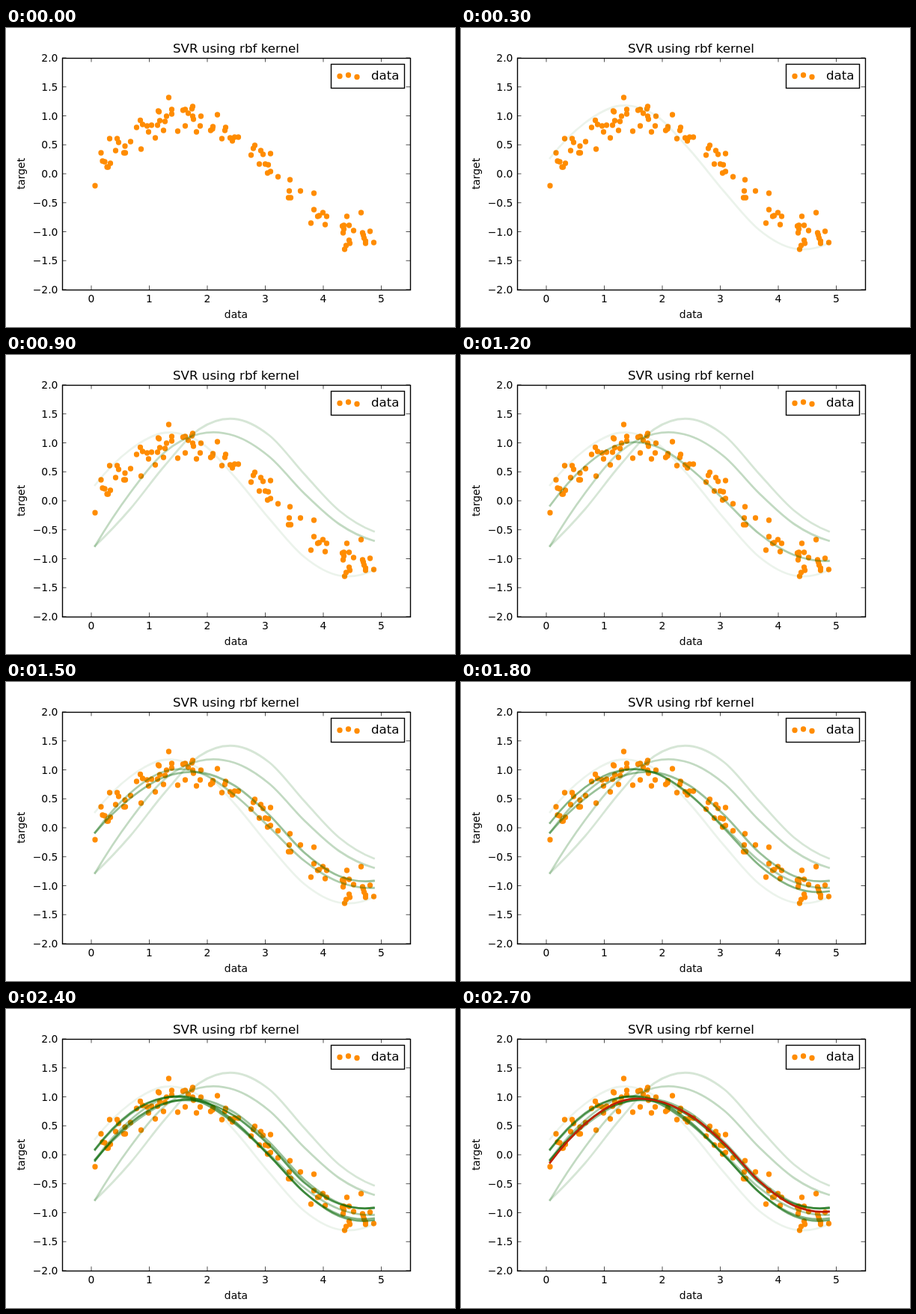
These frames come from a looping animation (600x400 px, 3900 ms). An HTML page:

```html
<!DOCTYPE html>
<html lang="en">
<head>
<meta charset="utf-8">
<title>SVR using rbf kernel</title>
<style>
  html, body { margin: 0; width: 100%; height: 100%; overflow: hidden; background: #fff; }
  svg { display: block; width: 600px; height: 400px; }
  text { font: 13.89px "DejaVu Sans", sans-serif; fill: #000; }
  .large { font-size: 16.67px; }
  .frame { fill: none; stroke: #000; stroke-width: 1.39; }
  .ticks { stroke: #000; stroke-width: 0.69; }
  .dots { fill: #ff8c00; }
  .fits { fill: none; stroke-width: 2.78; stroke-linecap: square; stroke-linejoin: round; }
</style>
</head>
<body>
<svg id="plot" viewBox="0 0 600 400"></svg>
<script>
const LOOP = 3900, STEP = 300;
const LEFT = 75, RIGHT = 540, TOP = 40, BOTTOM = 350, UNIT = 77.5;
const plot = document.getElementById('plot');

function add(parent, tag, attrs, text) {
  const node = document.createElementNS('http://www.w3.org/2000/svg', tag);
  for (const key in attrs) node.setAttribute(key, attrs[key]);
  if (text) node.textContent = text;
  return parent.appendChild(node);
}
const group = name => add(plot, 'g', { class: name });
const label = (text, x, y, anchor = 'middle', extra = {}) =>
  add(plot, 'text', { x, y, 'text-anchor': anchor, ...extra }, text);

// Samples as [x, y] in stage pixels
const rising = [
  [119, 211], [127, 167], [129, 178], [132, 179], [135, 186], [136.5, 186], [138.5, 148],
  [139.5, 181], [146.5, 164], [148.5, 148], [150.5, 153], [157.5, 167], [159, 158],
  [159.5, 167], [166.5, 152], [174.5, 133], [179.5, 123.5], [180.5, 162], [182.5, 129],
  [188.5, 131], [190.5, 139], [194.5, 130], [199.5, 147], [202.5, 130], [203.5, 111],
  [204.5, 112], [205.5, 124], [210.5, 137], [212.5, 125], [214.5, 118], [217.5, 93],
  [221.5, 109], [221.5, 115], [229.5, 138], [236.5, 110], [239.5, 109], [239.5, 131],
  [243.5, 114], [248.5, 108], [249.5, 105], [249.5, 118], [250.5, 122]
];
const falling = [
  [254.5, 139], [259.5, 131], [260.5, 118], [273.5, 137], [276, 135], [276.5, 132],
  [282.5, 116], [288.5, 148], [292.5, 137], [293.5, 133], [299.5, 147], [302.5, 151],
  [305.5, 146], [310.5, 146], [327.5, 170], [330.5, 161], [332.5, 157], [338.5, 182],
  [340.5, 164], [343.5, 169], [346.5, 182], [349.5, 194], [350.5, 183], [353.5, 168],
  [353.5, 192], [363.5, 199], [377.5, 227], [378.5, 218], [379.5, 203], [380.5, 227],
  [393.5, 218], [407.5, 261], [411.5, 221], [411.5, 243], [416.5, 252], [418.5, 251],
  [423.5, 247], [426.5, 263], [428.5, 252], [449.5, 265], [450.5, 274], [451.5, 264],
  [451.5, 269], [452.5, 296], [454.5, 291], [455.5, 252], [458.5, 264], [458.5, 284],
  [459.5, 288], [464.5, 271], [474.5, 247], [476.5, 274], [477.5, 277], [478.5, 281],
  [480.5, 285], [480.5, 288], [486.5, 272], [491.5, 287]
];

// Heights of each fit at evenly spaced knots, in order of appearance
const fits = [
  [174, 127, 104, 116, 162.5, 219, 270, 295, 287.5],
  [255.5, 206.5, 148, 99, 85.5, 107.5, 159, 208, 236],
  [255.5, 185, 130, 105.5, 108, 136, 185, 226, 248.5],
  [201.5, 149, 119.5, 121.5, 151, 194, 239, 267.5, 275.5],
  [201.5, 156, 127, 121, 138.5, 178, 228, 259.5, 266],
  [188.5, 141, 118.5, 121.5, 150, 196, 245, 275, 280],
  [187.5, 139.5, 118.5, 124, 153, 196, 245, 277, 282.5],
  [203, 153, 126, 123.5, 143, 182, 232, 260.5, 266],
  [205.5, 154, 124, 122, 141.5, 180, 230, 263, 271]
];

function smoothPath(ys, x0 = 119, x1 = 491.5) {
  const last = ys.length - 1, dx = (x1 - x0) / last;
  const slope = i => {
    if (i === 0) return (-3 * ys[0] + 4 * ys[1] - ys[2]) / 2;
    if (i === last) return (3 * ys[last] - 4 * ys[last - 1] + ys[last - 2]) / 2;
    return (ys[i + 1] - ys[i - 1]) / 2;
  };
  let d = `M${x0} ${ys[0]}`;
  for (let i = 0; i < last; i++) {
    const x = x0 + i * dx;
    d += `C${x + dx / 3} ${ys[i] + slope(i) / 3} ` +
         `${x + dx * 2 / 3} ${ys[i + 1] - slope(i + 1) / 3} ${x + dx} ${ys[i + 1]}`;
  }
  return d;
}

function drawDots(points) {
  const dots = group('dots');
  for (const [cx, cy] of points) add(dots, 'circle', { cx, cy, r: 3.65 });
}

function drawAxes() {
  const ticks = group('ticks');
  const tick = (x1, y1, x2, y2) => add(ticks, 'line', { x1, y1, x2, y2 });
  for (let v = 0; v <= 5; v++) {
    const x = 114 + v * UNIT;
    tick(x, BOTTOM, x, BOTTOM - 5.5);
    tick(x, TOP, x, TOP + 5.5);
    label(String(v), x, 367);
  }
  for (let v = -2; v <= 2; v += 0.5) {
    const y = 195 - v * UNIT;
    tick(LEFT, y, LEFT + 5.5, y);
    tick(RIGHT, y, RIGHT - 5.5, y);
    label(v.toFixed(1).replace('-', '\u2212'), 69.4, y + 5, 'end');
  }
  add(plot, 'rect', { class: 'frame', x: 75.5, y: 40.5, width: 465, height: 310 });
  label('SVR using rbf kernel', 307.5, 33, 'middle', { class: 'large' });
  label('data', 307.5, 388);
  label('target', 0, 0, 'middle', { transform: 'translate(25 195) rotate(-90)' });
}

function drawLegend() {
  add(plot, 'rect', { class: 'frame', x: 434.5, y: 48.5, width: 98, height: 32 });
  drawDots([[446, 64.5], [457.5, 63], [469, 65.5]]);
  label('data', 488, 69, 'start', { class: 'large' });
}

drawDots([...rising, ...falling]);
const layer = group('fits');
const lines = fits.map((ys, i) => {
  const final = i === fits.length - 1;
  return add(layer, 'path', {
    d: smoothPath(ys),
    stroke: final ? '#be2006' : '#006400',
    'stroke-opacity': final ? 1 : 0.08 * (i + 1)
  });
});
drawAxes();
drawLegend();

function render(time) {
  const shown = Math.floor((time % LOOP) / STEP);
  lines.forEach((line, i) => line.setAttribute('visibility', i < shown ? 'visible' : 'hidden'));
}

const start = performance.now();
function loop() {
  render(performance.now() - start);
  requestAnimationFrame(loop);
}
loop();
</script>
</body>
</html>
```
